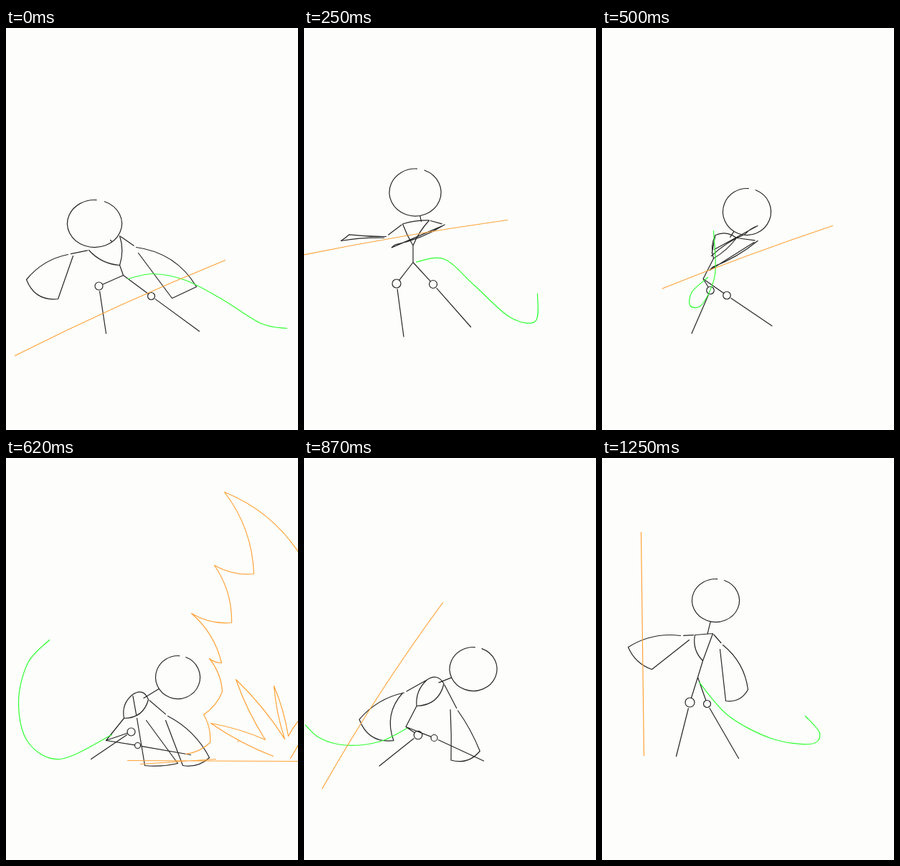
Animation, 407 px wide and 560 px high, one loop 1500 ms. Source, as an HTML page with a canvas:

```html
<!DOCTYPE html>
<html>
<head>
<meta charset="utf-8">
<style>
html, body { margin: 0; width: 100%; height: 100%; overflow: hidden; background: #fdfefc; }
canvas { display: block; }
</style>
</head>
<body>
<canvas id="stage" width="407" height="560"></canvas>
<script>
const INK = '#262626', ORANGE = '#ffa238', GREEN = '#30ff30';
const ctx = document.getElementById('stage').getContext('2d');

// Bowed strokes read x, y, bow, x, y, ... where bow is the sag of a side relative to its length.
// head: centre and radii; chest: right collar, waist, left collar; legs: knee, knee radius, foot.
const crouch = {
  head: [123, 272, 38, 33],
  chest: [158, 289, -.08, 158, 330, -.1, 115, 309],
  hip: [163, 344],
  sleeveL: [86, 315, .09, 28, 350, .19, 72, 377, 0, 93, 317],
  sleeveR: [181, 305, -.12, 265, 360, 0, 231, 376, 0, 184, 313],
  legL: [129, 359, 5.5, 139, 425],
  legR: [202, 373, 5, 269, 422],
  tail: [169, 349, 205, 342, 250, 351, 300, 377, 355, 411, 391, 418],
  staff: [12, 456, -.01, 305, 323]
};
const rise = {
  head: [145, 251, 36, 31],
  chest: [172, 287, 0, 157, 326, 0, 135, 298, -.08, 172, 287],
  hip: [161, 347],
  sleeveL: [106, 308, .06, 46, 342, .13, 93, 364, -.05, 106, 308],
  sleeveR: [183, 314, -.09, 222, 391, -.1, 184, 390, 0, 181, 315],
  legL: [130, 362, 7, 146, 428],
  legR: [195, 369, 4.5, 248, 416],
  tail: [165, 342, 215, 328, 260, 339, 310, 376, 360, 416, 400, 428],
  staff: [-5, 328, 0, 334, 406]
};
const lift = {
  head: [164, 206, 36, 35],
  chest: [176, 248, .09, 146, 279, -.05, 139, 247, 0, 176, 248],
  hip: [142, 305],
  sleeveL: [122, 272, -.09, 67, 236, -.17, 94, 209, 0, 117, 268],
  sleeveR: [208, 233, 0, 186, 154, .17, 147, 174, 0, 202, 231],
  legL: [127, 349, 5, 131, 431],
  legR: [164, 344, 6.5, 216, 416],
  tail: [147, 309, 175, 315, 215, 378, 262, 428, 284, 400, 250, 311],
  staff: [-2, 304, -.015, 232, 128]
};
const slam = {
  head: [239, 305, 31, 30],
  chest: [198, 336, -.19, 164, 362, -.15, 176, 329, -.3, 198, 336],
  hip: [139, 393],
  sleeveL: [182, 362, 0, 193, 428, .04, 239, 425, 0, 195, 365],
  sleeveR: [225, 359, -.08, 283, 417, -.12, 246, 428, 0, 222, 365],
  legL: [174, 381, 5.5, 118, 419],
  legR: [183, 400, 4, 257, 413],
  tail: [147, 385, 75, 419, 30, 395, 17, 340, 30, 285, 60, 253],
  staff: [169, 421, 0, 410, 422],
  fire: [
    [410, 135, .08, 304, 47],
    jagged(-.08, 304, 47, 345, 161, 290, 149, 314, 229, 258, 216, 300, 285, 283, 279, 301, 325, 275, 357, 284, 396, 250, 412),
    jagged(-.03, 372, 415, 285, 369, 361, 392, 320, 308, 388, 391, 373, 317, 393, 387, 410, 362),
    [396, 418, 0, 410, 394],
    [187, 426, 0, 292, 419],
    [323, 394, 0, 323, 395]
  ]
};
const sweep = {
  head: [236, 304, 32, 31],
  chest: [199, 332, -.24, 161, 361, -.15, 177, 328, -.2, 199, 332],
  hip: [141, 394],
  sleeveL: [140, 349, .07, 72, 381, .25, 144, 408, -.3, 136, 352],
  sleeveR: [233, 365, 0, 273, 428, -.08, 222, 432, 0, 218, 364],
  legL: [170, 382, 6, 116, 425],
  legR: [191, 400, 4, 271, 416],
  tail: [155, 400, 110, 411, 70, 401, 36, 381, 13, 354, -2, 322],
  fire: [
    [93, 389, 0, 80, 459, .13, 292, 424],
    jagged(-.05, 292, 424, 156, 436, 204, 417, 110, 420, 131, 412, 99, 398)
  ]
};
const stand = {
  head: [235, 283, 34, 30],
  chest: [190, 296, -.14, 152, 329, -.1, 165, 289, -.33, 190, 296],
  hip: [142, 354],
  sleeveL: [138, 304, .1, 72, 350, .14, 101, 372, 0, 139, 303],
  sleeveR: [195, 338, -.06, 216, 388, -.24, 187, 409, .02, 189, 336],
  legL: [147, 389, 5.5, 93, 432],
  legR: [171, 379, 5, 229, 427],
  tail: [131, 352, 112, 374, 85, 398, 55, 415, 25, 422, 5, 421],
  staff: [25, 460, -.015, 193, 201]
};
const proud = {
  head: [158, 198, 33, 30],
  chest: [154, 244, 0, 140, 282, -.13, 129, 246, 0, 154, 244],
  hip: [133, 305],
  sleeveL: [109, 247, .09, 36, 263, .11, 69, 294, 0, 121, 253],
  sleeveR: [168, 260, -.1, 203, 322, -.17, 172, 338, 0, 164, 266],
  legL: [122, 340, 6.5, 103, 415],
  legR: [146, 342, 5, 190, 418],
  tail: [135, 312, 175, 358, 235, 390, 290, 398, 303, 383, 283, 359],
  staff: [58, 414, 0, 54, 103]
};

// A bowed stroke with the same bow on every side.
function jagged(bow, x, y, ...rest) {
  const path = [x, y];
  for (let i = 0; i < rest.length; i += 2) path.push(bow, rest[i], rest[i + 1]);
  return path;
}

const mix = (a, b) => a.map((v, i) => (v + b[i]) / 2);

// Turn a bowed stroke about its first point.
function spin(path, angle) {
  const c = Math.cos(angle), s = Math.sin(angle), [ox, oy] = path;
  return path.map((v, i) => {
    const axis = i % 3, x = path[i - axis] - ox, y = path[i - axis + 1] - oy;
    return [ox + x * c - y * s, oy + x * s + y * c, v][axis];
  });
}

// Sleeves swing around the shoulder instead of collapsing through it.
function swing(a, b) {
  const aim = p => Math.atan2(p[7] - p[1], p[6] - p[0]);
  const turn = aim(b) - aim(a);
  const half = Math.atan2(Math.sin(turn), Math.cos(turn)) / 2;
  return mix(spin(a, half), spin(b, -half));
}

function between(a, b) {
  const pose = { staff: a.staff ? mix(a.staff, b.staff) : b.staff };
  for (const part of ['head', 'chest', 'hip', 'legL', 'legR', 'tail']) pose[part] = mix(a[part], b[part]);
  for (const part of ['sleeveL', 'sleeveR']) pose[part] = swing(a[part], b[part]);
  return pose;
}

const steps = [
  [0, crouch], [120, rise], [250, between(rise, lift)], [370, lift],
  [500, between(lift, slam)], [620, slam], [750, sweep],
  [870, between(sweep, stand)], [1000, stand],
  [1120, between(stand, proud)], [1250, proud]
];

function stroke(colour, trace) {
  ctx.strokeStyle = colour;
  ctx.beginPath();
  trace();
  ctx.stroke();
}

function bowed(path) {
  let [x, y] = path;
  ctx.moveTo(x, y);
  for (let i = 2; i < path.length; i += 3) {
    const [bow, nx, ny] = path.slice(i, i + 3);
    ctx.quadraticCurveTo((x + nx) / 2 - 2 * bow * (ny - y), (y + ny) / 2 + 2 * bow * (nx - x), nx, ny);
    [x, y] = [nx, ny];
  }
}

function spline(pts) {
  const last = pts.length / 2 - 1;
  const at = (i, axis) => pts[2 * Math.max(0, Math.min(last, i)) + axis];
  const handle = (i, side) => [0, 1].map(k => at(i, k) + side * (at(i + 1, k) - at(i - 1, k)) / 6);
  ctx.moveTo(pts[0], pts[1]);
  for (let i = 0; i < last; i++) {
    ctx.bezierCurveTo(...handle(i, 1), ...handle(i + 1, -1), at(i + 1, 0), at(i + 1, 1));
  }
}

// Straight bone that stops short of each joint.
function bone([ax, ay], [bx, by], gapA = 0, gapB = 0) {
  const angle = Math.atan2(by - ay, bx - ax), c = Math.cos(angle), s = Math.sin(angle);
  ctx.moveTo(ax + gapA * c, ay + gapA * s);
  ctx.lineTo(bx - gapB * c, by - gapB * s);
}

function leg(hip, [x, y, r, footX, footY]) {
  bone(hip, [x, y], 0, r);
  ctx.moveTo(x + r, y);
  ctx.arc(x, y, r, 0, 7);
  bone([x, y], [footX, footY], r + 2);
}

function neck([x, y, rx, ry], tx, ty) {
  const reach = 1 / Math.hypot((tx - x) / rx, (ty - y) / ry);
  bone([x + (tx - x) * reach, y + (ty - y) * reach], [tx, ty]);
}

function body({ head, chest, hip, sleeveL, sleeveR, legL, legR }) {
  const [rx, ry, , wx, wy, , lx, ly] = chest;
  ctx.ellipse(...head, 0, -1.2, 4.78);
  neck(head, rx * .7 + lx * .3, ry * .7 + ly * .3);
  bowed(chest);
  bone([wx, wy], hip);
  bone([lx, ly], sleeveL, 2, 4);
  bone([rx, ry], sleeveR, 2, 4);
  bowed(sleeveL);
  bowed(sleeveR);
  leg(hip, legL);
  leg(hip, legR);
}

function draw() {
  const time = performance.now() % 1500;
  const pose = steps.filter(step => step[0] <= time).pop()[1];
  ctx.setTransform(1, 0, 0, 1, .5, .5);
  ctx.fillStyle = '#fdfefc';
  ctx.fillRect(-1, -1, 409, 562);
  ctx.lineWidth = 1.2;
  ctx.lineCap = ctx.lineJoin = 'round';
  stroke(INK, () => body(pose));
  stroke(GREEN, () => spline(pose.tail));
  stroke(ORANGE, () => {
    if (pose.staff) bowed(pose.staff);
    (pose.fire || []).forEach(bowed);
  });
  requestAnimationFrame(draw);
}
draw();
</script>
</body>
</html>
```
